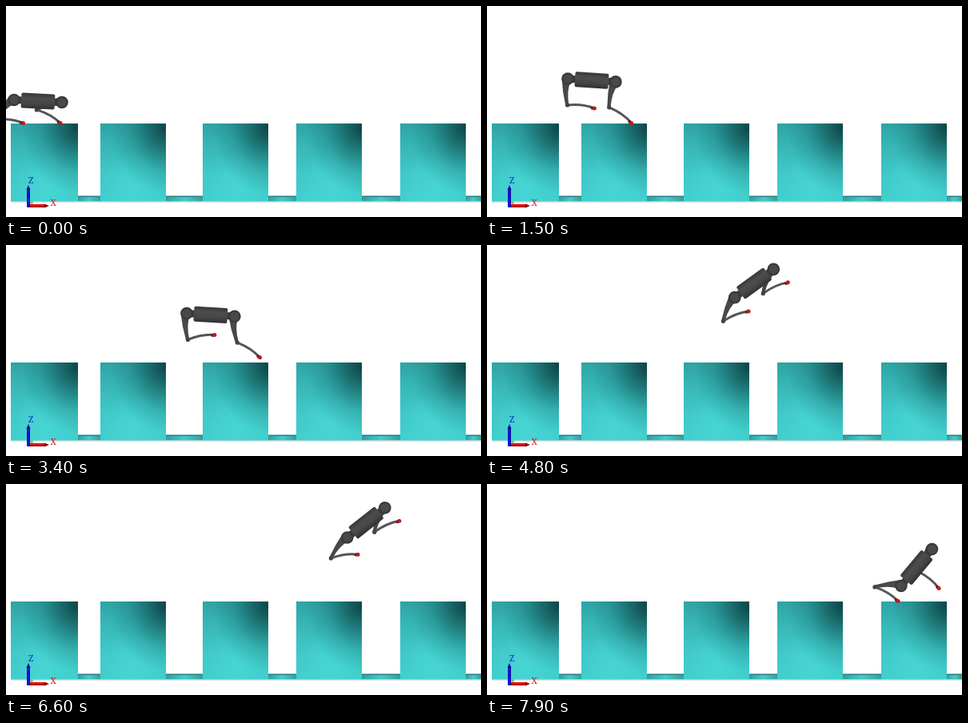
Recreate the animation shown at these times as an HTML page with a canvas. Size 594 px wide and 264 px high, loop 8000 ms.

```html
<!DOCTYPE html>
<html>
<head>
<meta charset="utf-8">
<style>
html, body { margin: 0; width: 594px; height: 264px; overflow: hidden; background: #fff; }
canvas { display: block; }
</style>
</head>
<body>
<canvas id="stage" width="594" height="264"></canvas>
<script>
const c = document.getElementById('stage').getContext('2d');
const LOOP = 8000, STEP = 100, GROUND = 146.5;
const THIGH = 33, SHIN = 34, HALF = 30, STANCE = 46.5, CROUCH = 18.5;
const blocks = [[6, 90], [118, 200], [246, 328], [363, 445], [493, 575]];

// One hop runs from the crouch on one block to the crouch on the next
const hopStarts = [0, 1960, 3820, 5650, 7450];
const footholds = [21.5, 134, 271, 381, 514, 630];
const airborne = { front: [335, 1510], rear: [700, 1645] };

// Shared hop: time, share of the distance, trunk height, pitch (nose up is positive)
const hopPose = [
  [0, 0, 119, -3], [300, .01, 117.5, 6], [450, .04, 104.5, 50],
  [700, .19, 70, 53], [980, .405, 48, 36], [1200, .57, 56, 16],
  [1470, .78, 90.5, -4], [1650, .95, 103, 0], [1800, 1, 119, -3]
];

const mix = (a, b, w) => a + (b - a) * w;
const smooth = x => x * x * (3 - 2 * x);
const polar = ([x, y], r, a) => [x + r * Math.cos(a), y + r * Math.sin(a)];

// Monotone cubic through one column of the hop, at rest at both ends
function pose(phase, col) {
  const last = hopPose.length - 1;
  let i = 0;
  while (i < last - 1 && hopPose[i + 1][0] <= phase) i++;
  const slope = k => (hopPose[k + 1][col] - hopPose[k][col]) / (hopPose[k + 1][0] - hopPose[k][0]);
  const tangent = k => {
    if (k === 0 || k === last) return 0;
    const a = slope(k - 1), b = slope(k);
    return a * b <= 0 ? 0 : 2 * a * b / (a + b);
  };
  const [p, q] = [hopPose[i], hopPose[i + 1]];
  const h = q[0] - p[0], u = Math.min(1, (phase - p[0]) / h);
  return mix(p[col], q[col], smooth(u)) + h * u * (1 - u) * ((1 - u) * tangent(i) - u * tangent(i + 1));
}

// Feet hold the ground, tuck under the hip in the air and reach out to land
function footAt(phase, side, hip, from, to) {
  const [lift, land] = airborne[side];
  const w = smooth(Math.max(0, Math.min(1, (phase - lift) / 300, (land - phase) / 300)));
  const tuck = 18 + Math.max(0, phase - 980) * .03;
  const hold = (phase < (lift + land) / 2 ? from : to) + (side === 'front' ? STANCE : 0);
  const dx = mix(hold, hip[0] + tuck, w) - hip[0];
  const dy = mix(GROUND, hip[1] + 16.5, w) - hip[1];
  return polar(hip, Math.min(THIGH + SHIN - 1, Math.hypot(dx, dy)), Math.atan2(dy, dx));
}

function disc([x, y], r, fill) {
  c.fillStyle = fill;
  c.beginPath();
  c.arc(x, y, r, 0, 7);
  c.fill();
}

function shade(g, ...stops) {
  stops.forEach((s, i) => g.addColorStop(i / (stops.length - 1), s));
  return g;
}

function drawLeg(hip, foot) {
  const d = Math.hypot(foot[0] - hip[0], foot[1] - hip[1]);
  const bend = Math.acos((THIGH ** 2 + d * d - SHIN ** 2) / (2 * THIGH * d));
  const a = Math.atan2(foot[1] - hip[1], foot[0] - hip[0]) + bend;
  const knee = polar(hip, THIGH, a);

  // The thigh bulges backwards
  c.save();
  c.translate(...hip);
  c.rotate(a);
  c.fillStyle = '#48484a';
  c.beginPath();
  c.moveTo(0, 7.4);
  c.quadraticCurveTo(16, 6.5, THIGH, 2.4);
  c.lineTo(THIGH, -1.8);
  c.quadraticCurveTo(14, 1.5, 3, -4);
  c.fill();
  c.restore();

  const dx = foot[0] - knee[0], dy = foot[1] - knee[1];
  c.strokeStyle = '#555557';
  c.lineWidth = 3;
  c.lineCap = 'round';
  c.beginPath();
  c.moveTo(...knee);
  c.quadraticCurveTo(knee[0] + dx * .55 + dy * .12, knee[1] + dy * .55 - dx * .12, ...foot);
  c.stroke();
  disc(knee, 2.6, '#434345');
  disc(polar(foot, -2.5, Math.atan2(dy, dx)), 2, '#5a1a1e');
  disc(foot, 2.5, '#c4161f');
}

function drawRobot(t) {
  const hop = hopStarts.findLastIndex(s => s <= t);
  const phase = t - hopStarts[hop];
  const [from, to] = footholds.slice(hop, hop + 2);
  const centre = [mix(from, to, pose(phase, 1)) + CROUCH, pose(phase, 2)];
  const tilt = -pose(phase, 3) * Math.PI / 180;
  const rear = polar(centre, -HALF, tilt), front = polar(centre, HALF, tilt);
  drawLeg(front, footAt(phase, 'front', front, from, to));
  drawLeg(rear, footAt(phase, 'rear', rear, from, to));

  c.save();
  c.translate(...centre);
  c.rotate(tilt);
  c.fillStyle = '#3b3b3d';
  c.fillRect(-27, -4.5, 54, 9);
  c.fillStyle = shade(c.createLinearGradient(0, -10, 0, 10), '#353536', '#4d4d4f', '#464648', '#2f2f30');
  c.beginPath();
  c.roundRect(-21, -9.5, 42, 19, 2);
  c.fill();
  c.restore();

  for (const hip of [rear, front]) {
    disc(hip, 7.8, '#39393b');
    disc(hip, 5.6, '#49494b');
  }
}

function drawBlock([l, r]) {
  const w = r - l, h = 97.5;
  c.save();
  c.translate(l, 147);
  c.scale(w, h);
  const fill = g => { c.fillStyle = g; c.fillRect(0, 0, 1, 1); };
  const glow = (x, y, size, ...stops) => fill(shade(c.createRadialGradient(x, y, 0, x, y, size), ...stops));
  fill(shade(c.createLinearGradient(0, 0, 0, 1), '#2fa3a3', '#38b9b8', '#3fc9c8', '#41cecd'));
  glow(.5, .85, .5, 'rgba(76,220,218,.6)', 'rgba(76,220,218,0)');
  glow(1, .05, .85, 'rgba(8,56,58,.88)', 'rgba(8,60,62,.52)', 'rgba(10,80,82,.2)', 'rgba(10,80,82,0)');
  c.restore();
}

function drawFloor() {
  blocks.forEach(([, l], i) => {
    const r = i < 4 ? blocks[i + 1][0] : 594;
    c.fillStyle = shade(c.createLinearGradient(l, 0, r, 0), '#2f9f9f', '#42cccb', '#329f9f');
    c.fillRect(l, 238, r - l, 6.5);
    c.fillStyle = '#247f80';
    c.fillRect(l, 237.5, r - l, 1.5);
  });
  c.fillStyle = '#b5c4c4';
  c.fillRect(6, 244.5, 588, 1);
}

function arrow(color, dark, angle) {
  c.save();
  c.translate(28, 250);
  c.rotate(angle);
  c.fillStyle = color;
  c.fillRect(-1.5, -2, 23, 4);
  c.fillStyle = dark;
  c.fillRect(-1.5, 1, 23, 1);
  c.beginPath();
  c.moveTo(20, -2.5);
  c.lineTo(26, 0);
  c.lineTo(20, 2.5);
  c.fill();
  c.restore();
}

function drawAxes() {
  disc([32, 246], 2, '#4fd87c');
  arrow('#e01010', '#8a0808', 0);
  arrow('#0a14e0', '#0a0a90', -Math.PI / 2);
  c.font = '11px "Noto Serif", serif';
  c.fillStyle = '#0830c8';
  c.fillText('Z', 28, 222);
  c.fillStyle = '#d01818';
  c.fillText('X', 55.5, 250);
}

function frame(now) {
  const t = Math.floor(now % LOOP / STEP) * STEP;
  c.fillStyle = '#fff';
  c.fillRect(0, 0, 594, 264);
  drawFloor();
  blocks.forEach(drawBlock);
  drawAxes();
  drawRobot(t);
}

const start = performance.now();
function tick() {
  frame(Math.max(0, performance.now() - start));
  requestAnimationFrame(tick);
}
tick();
</script>
</body>
</html>
```
